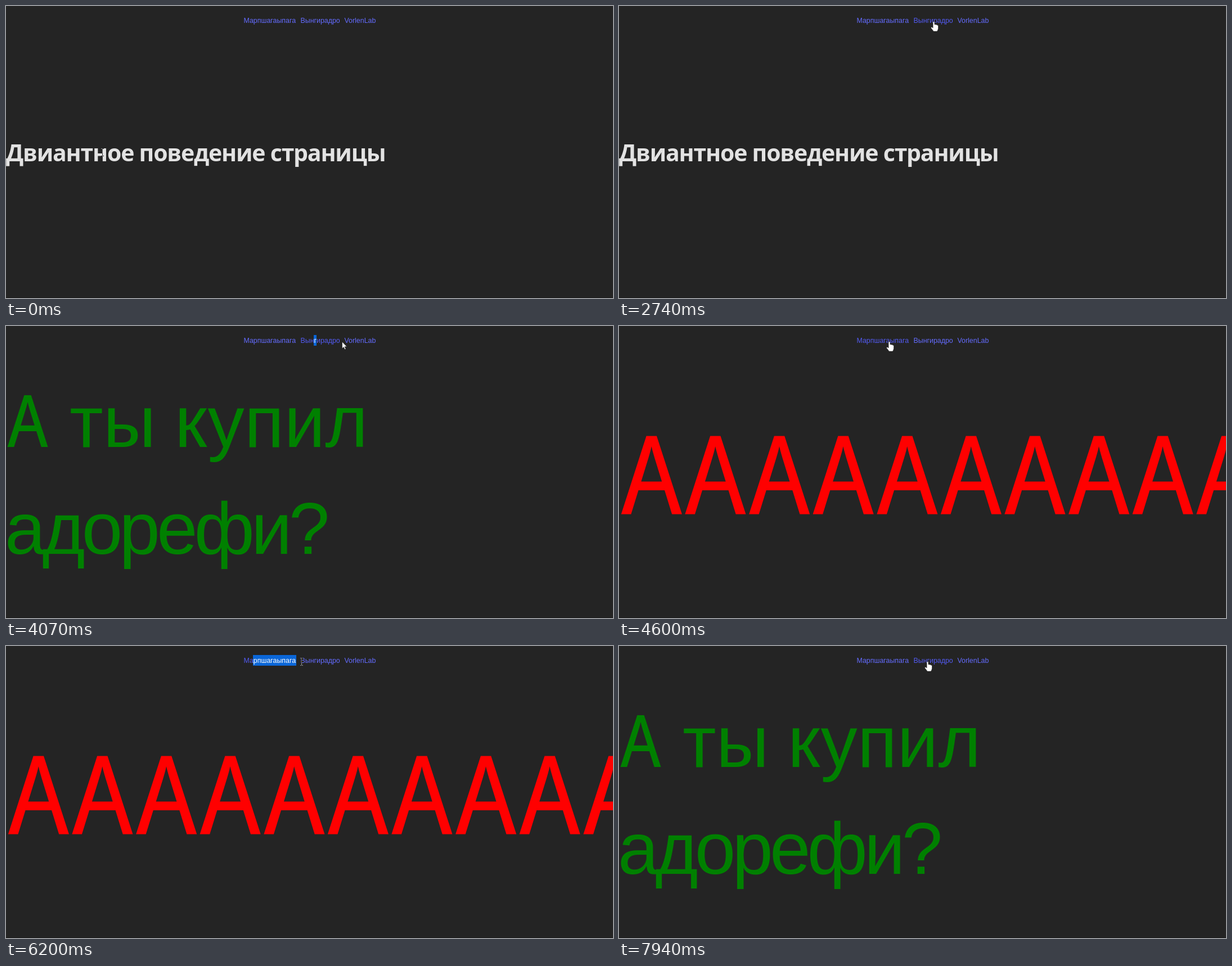
These frames come from a looping animation (1079 px wide and 519 px high, 8 s). An HTML page:

```html
<!DOCTYPE html>
<html lang="ru">
<head>
<meta charset="utf-8">
<style>
  html, body { margin: 0; height: 100%; overflow: hidden; background: #242424; }
  svg { display: block; width: 1079px; height: 519px; }
  .link { font: 12.4px "Liberation Sans", Arial, sans-serif; fill: #646cff; }
  .hover { fill: #535bf2; }
  #picked .link { fill: #fff; }
  #title { font: 700 41px "Noto Sans", sans-serif; letter-spacing: -1.2px; fill: #e2e2e2; }
  #green { font: 130.5px "Liberation Sans", Arial, sans-serif; fill: #008000; }
  #green .tight { letter-spacing: -6px; }
  #green .capital { font: 128.5px "Noto Sans Mono", monospace; }
  #red { font: 193px "Noto Sans Mono", monospace; letter-spacing: -2.2px; fill: #f00; }
  #beam { mix-blend-mode: difference; }
</style>
</head>
<body>
<svg viewBox="0 0 1079 519">
  <clipPath id="range"><rect class="span" y="16" height="19"/></clipPath>
  <rect y="518" width="1079" height="1" fill="#191919"/>
  <text id="title" y="276">Двиантное поведение страницы</text>
  <g id="green">
    <text class="capital" y="215">А</text>
    <text x="113" y="215">ты</text>
    <text x="300" y="215">купил</text>
    <text class="tight" x="-2" y="405">адорефи?</text>
  </g>
  <text id="red" y="335">АААААААААА</text>
  <g id="links"></g>
  <g id="picked">
    <rect class="span" y="16" height="19" fill="#0a66d8"/>
    <g id="light" clip-path="url(#range)"></g>
  </g>
  <path id="beam" d="M-2.5-6.5H-.5M.5-6.5H2.5M0-6V6M-2.5 6.5H-.5M.5 6.5H2.5" fill="none" stroke="#bbb"/>
  <path id="arrow" d="M0 0V12L2.8 9.5 4.7 13.8 6.6 13 4.7 8.8H8.5Z" fill="#fff" stroke="#111" stroke-width=".6"/>
  <path id="hand" d="M-1.4 .6Q0-1 1.4 .6V5Q2.8 4 3.9 5.4 5.2 4.6 6 6 7.8 5.6 8 7.4V12Q7.4 15 6 17H-.4Q-2 14.4-4.6 11.4-5.6 9.4-3.4 9.4L-1.4 11Z" fill="#fff" stroke="#111" stroke-width=".5"/>
</svg>
<script>
  const LOOP = 8000, STEP = 1000 / 15, ROW = 28;
  const $ = id => document.getElementById(id);
  const smooth = p => p * p * (3 - 2 * p);

  const links = [
    { string: 'Марпшагаыпага', left: 423, right: 516, page: 'red' },
    { string: 'Вынгирадро', left: 524, right: 594, page: 'green' },
    { string: 'VorlenLab', left: 602, right: 656 }
  ];
  const linkAt = x => links.find(link => x >= link.left && x <= link.right);

  for (const link of links) {
    link.node = document.createElementNS('http://www.w3.org/2000/svg', 'text');
    link.node.setAttribute('class', 'link');
    link.node.setAttribute('x', link.left - .5);
    link.node.setAttribute('y', 30);
    link.node.textContent = link.string;
    $('light').append(link.node.cloneNode(true));
    $('links').append(link.node);
  }

  // Places the mouse passes or clicks
  const pass = (t, x, y = ROW) => ({ t, x, y });
  const click = (t, x) => ({ t, x, y: ROW, clicked: linkAt(x) });
  const stops = [
    pass(0, 171, 260), pass(600, 650, 300), pass(900, 540, 134), pass(1200, 470),
    click(1467, 470), click(2133, 549), click(2533, 559), click(2933, 559), click(3333, 553),
    click(3600, 480), click(3933, 549), pass(4067, 597), click(4600, 480),
    click(5000, 555), pass(5200, 563), click(5533, 480), pass(5867, 441), pass(6200, 525),
    click(6533, 470), click(6800, 555), pass(7533, 549), pass(7733, 664), pass(7933, 548)
  ];

  // Text marked by dragging
  const drag = (from, to, left, right) => ({ from, to, left, right });
  const drags = [drag(3933, 4333, 547, 552), drag(5067, 5533, 559, 594),
    drag(5933, 6467, 439, 516), drag(7333, 7600, 524, 594)];

  // A link opens its page; a second click on it returns to the title
  function pageAt(now) {
    return stops.filter(stop => stop.clicked && stop.t <= now)
      .reduce((page, { clicked }) => page === clicked.page ? 'title' : clicked.page, 'title');
  }

  function mouseAt(now) {
    const i = stops.findLastIndex(stop => stop.t <= now);
    const a = stops[i], b = stops[i + 1] || a;
    const travel = (b.t - a.t) * (a.clicked ? .6 : 1) || 1;
    const k = smooth(Math.min(1, (now - a.t) / travel));
    return { x: a.x + (b.x - a.x) * k, y: a.y + (b.y - a.y) * k };
  }

  function showOnly(ids, chosen) {
    for (const id of ids) $(id).style.display = id === chosen ? '' : 'none';
  }

  function render(time) {
    const now = Math.floor((time + 4) / STEP) * STEP + 1;
    const page = pageAt(now), { x, y } = mouseAt(now);
    const marked = drags.find(({ from, to }) => now >= from && now < to);
    const held = marked && linkAt(marked.left);
    const over = y < 37 ? linkAt(x) : undefined;
    const onTitle = page === 'title' && x < 683 && Math.abs(y - 262) < 28;

    let shape = onTitle ? 'beam' : 'arrow';
    if (over) shape = held && held !== over ? 'beam' : 'hand';

    showOnly(['title', 'green', 'red'], page);
    showOnly(['beam', 'arrow', 'hand'], shape);
    $(shape).setAttribute('transform', `translate(${Math.round(x) + .5} ${Math.round(y)})`);

    showOnly(['picked'], marked && 'picked');
    if (marked) for (const box of document.querySelectorAll('.span')) {
      box.setAttribute('x', marked.left);
      box.setAttribute('width', marked.right - marked.left);
    }
    for (const link of links) link.node.classList.toggle('hover', link === (held || over));
  }

  function tick() {
    render(performance.now() % LOOP);
    requestAnimationFrame(tick);
  }
  tick();
</script>
</body>
</html>
```
